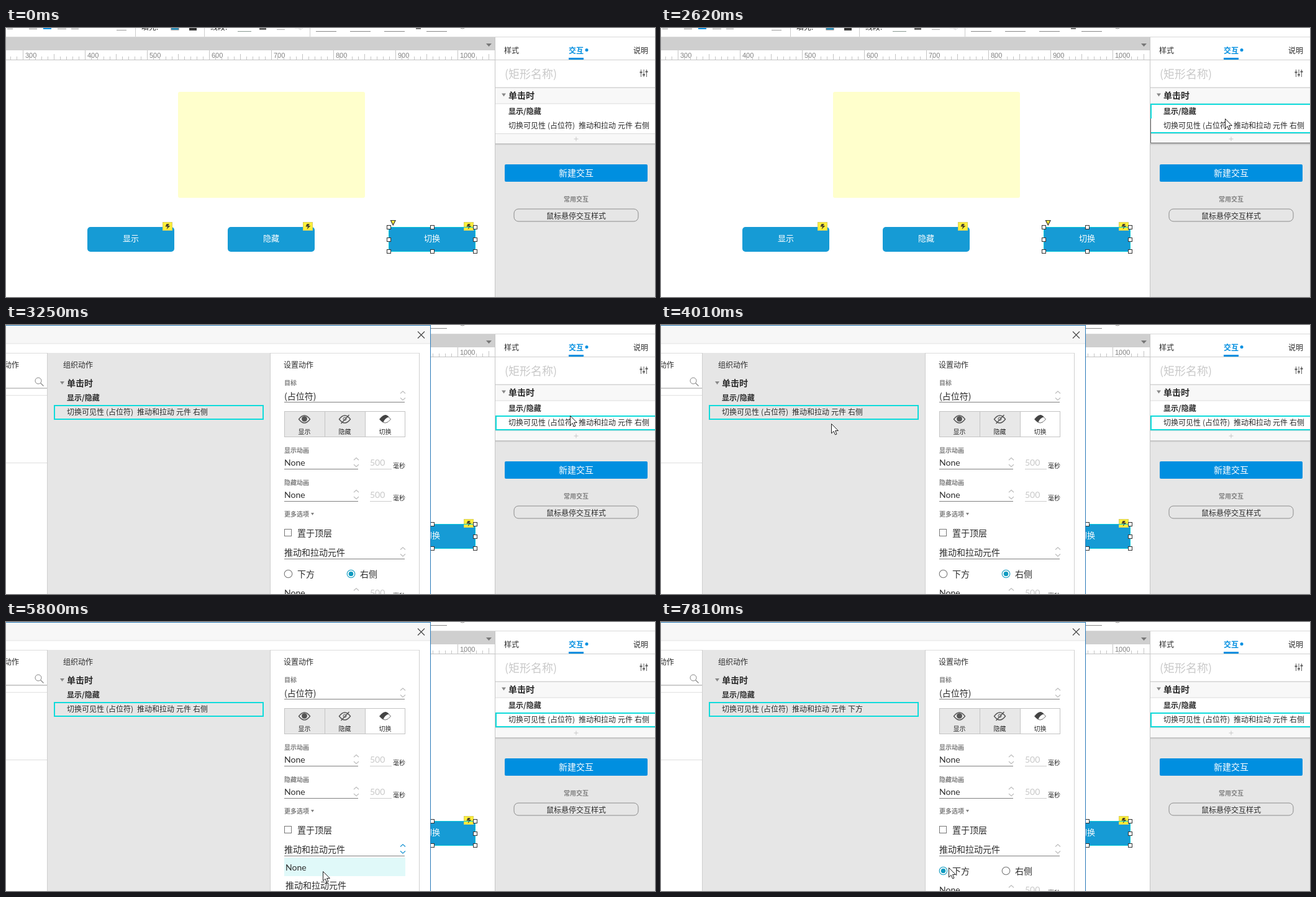
An HTML page for the animation above (8000 ms loop, 1045 by 434 pixels).

```html
<!DOCTYPE html>
<html lang="zh-CN">
<head>
<meta charset="utf-8">
<title>切换可见性</title>
<style>
  html, body { margin: 0; width: 100%; height: 100%; overflow: hidden; background: #fff; }
  svg { display: block; }
  text { font-family: "Noto Sans CJK SC", "Noto Sans CJK", "Noto Sans CJK JP", sans-serif; }
  .latin { font-family: Lato, sans-serif; }
  .ruler { font-family: "Liberation Sans", Arial, sans-serif; }
</style>
</head>
<body>
<svg id="stage" width="1045" height="434" viewBox="0 0 1045 434"></svg>
<script>
const LOOP = 8000;
const CYAN = '#0fdbdb', BLUE = '#008fe0', INK = '#2b2b2b', GRAY = '#808080';

const rect = (x, y, w, h, fill, extra = '') =>
  `<rect x="${x}" y="${y}" width="${w}" height="${h}" fill="${fill}" ${extra}/>`;
const frame = (x, y, w, h, color, width = 1, extra = '') =>
  rect(x, y, w, h, 'none', `stroke="${color}" stroke-width="${width}" ${extra}`);
const path = (d, stroke, width = 1, fill = 'none') =>
  `<path d="${d}" fill="${fill}" stroke="${stroke}" stroke-width="${width}"/>`;
// Text is placed by its left edge and the vertical centre of its glyphs.
const text = (x, cy, size, str, fill = INK, extra = '') =>
  `<text x="${x}" y="${cy + size * 0.38}" font-size="${size}" fill="${fill}" ${extra}>${str}</text>`;
const bold = 'font-weight="700"';
const latin = (x, cy, str, fill = INK) => text(x, cy, 14, str, fill, 'class="latin"');
const group = (id, body, extra = '') => `<g id="${id}" ${extra}>${body}</g>`;
const chevrons = (x, y, color = '#bdbdbd', id = '') =>
  `<path ${id && `id="${id}"`} d="M${x - 4} ${y - 3.5}l4-3.7 4 3.7m-8 7l4 3.7 4-3.7" fill="none" stroke="${color}" stroke-width="1.2"/>`;

function actionText(x, cy, sideId = '') {
  const words = [[0, '切换可见性'], [63, '(占位符)'], [113, '推动和拉动'], [176, '元件'], [203, '右侧']];
  return words.map(([dx, s], i) =>
    text(x + dx, cy, 12, s, INK, i === 4 && sideId ? `id="${sideId}"` : '')).join('');
}

function toolbar() {
  const marks = [
    [2, 1, 9, '#999'], [37, 1, 13, '#888'], [60, 0, 13, BLUE], [83, 1, 14, '#999'],
    [105, 1, 12, '#999'], [178, 3, 16, '#999'], [373, 5, 22, '#8a9a92'], [436, 2, 13, '#aaa'],
    [499, 5, 33, '#888'], [554, 5, 33, '#888'], [609, 5, 33, '#888'], [677, 5, 33, '#888']
  ];
  let s = rect(0, 0, 1045, 14, '#fff');
  for (const [x, y, w, c] of marks) s += rect(x, y, w, c === BLUE ? 2 : 1, c);
  for (const x of [208, 319, 489]) s += rect(x, 0, 1, 14, '#ccc');
  s += text(218, -2, 12, '填充:') + text(329, -2, 12, '线段:');
  s += rect(266, 0, 12, 3, '#169bd5', 'stroke="#777"') + rect(295, 0, 12, 4, '#333');
  s += rect(408, 0, 11, 3, '#666') + path('M465 0h9v3m-3-2l3 2 4-3', '#ddd');
  s += rect(660, 0, 8, 2, '#777') + path('M731 -2a4 3 0 0 0 8 0', '#999');
  return s + rect(0, 14, 1045, 1, '#d8d8d8');
}

function ruler() {
  let s = rect(0, 15, 787, 21, '#cfcfcf') + path('M773 25h9l-4.5 5z', 'none', 0, '#777');
  s += rect(0, 36, 787, 15, '#fff');
  for (let x = 7, n = 280; x < 787; x += 10, n += 10) {
    const h = n % 100 === 0 ? 15 : n % 50 === 0 ? 9 : 5;
    s += rect(x, 51 - h, 1, h, '#c4c4c4');
    if (n % 100 === 0) s += text(x + 4, 43.5, 11, n, '#808080', 'class="ruler"');
  }
  return s + rect(0, 51, 787, 1, '#c4c4c4');
}

function button(x, label, r = 5) {
  return rect(x, 321, 140, 40, '#169bd5', `rx="${r}"`) +
    text(x + 57, 339.5, 13, label, '#fff') +
    rect(x + 121.5, 313.5, 15, 13, '#ffef3a', 'stroke="#d8cf60"') +
    path(`M${x + 127.5} 316h4.5l-2 3h3.5l-6 6 1.5-4.5h-3.5z`, 'none', 0, '#4a4530');
}

function canvasArea() {
  let s = rect(277, 103, 301, 171, '#ffffcc', 'rx="3"');
  s += button(131, '显示') + button(357, '隐藏') + button(616, '切换', 0);
  s += frame(616.5, 321.5, 139, 39, '#08c8d8');
  for (const y of [321, 341, 360])
    for (const x of [616, 686, 755])
      if (x !== 686 || y !== 341) s += rect(x - 2.5, y - 2.5, 6, 6, '#fff', 'stroke="#333"');
  return s + path('M619.5 310.5h7.5l-3.75 7.5z', '#333', 1.2, '#ffef3a');
}

function sidePanel() {
  let s = rect(787, 15, 258, 419, '#e6e6e6') + rect(788, 15, 257, 81, '#fff');
  s += text(802, 36, 12, '样式') + text(906, 36, 12, '交互', BLUE, bold) + text(1010, 36, 12, '说明');
  s += `<circle cx="935" cy="35.5" r="2.5" fill="${BLUE}"/>`;
  s += rect(788, 51, 257, 1, '#d0d0d0') + rect(906, 48, 24, 3, BLUE);
  s += text(803, 74, 18, '(矩形名称)', '#c9c9c9');
  s += path('M1022.5 67v12m4.5-12v12m4.5-12v12', '#666') +
    path('M1020.5 71.5h4m.5 4h4m.5-5h4', '#555', 2);
  s += rect(788, 95.5, 257, 1.5, '#d4d4d4') + rect(788, 97, 257, 25, '#f8f8f8');
  s += path('M798 105.5h7l-3.5 5z', 'none', 0, '#888') + text(809, 108.5, 14, '单击时', INK, bold);
  s += rect(788, 121, 257, 2, '#ececec') + rect(788, 123, 257, 47, '#fff');
  s += text(809, 134, 12, '显示/隐藏', INK, bold) + actionText(809, 157);
  s += rect(788, 170, 257, 1, '#dcdcdc') + rect(788, 171, 257, 15, '#f8f8f8');
  s += path('M914.5 179h7m-3.5-3.5v7', '#c8c8c8') + rect(788, 186, 257, 2.5, '#c9c9c9');
  s += rect(803, 220, 230, 28, BLUE, 'rx="2"') + text(890, 234, 14, '新建交互', '#fff');
  s += text(898, 276, 10, '常用交互', GRAY, bold);
  s += frame(818, 292, 200, 20, '#8c8c8c', 1, 'rx="7"') + text(870, 303, 12, '鼠标悬停交互样式');
  s += group('rowHover', frame(789, 147, 270, 22, CYAN, 2));
  s += group('actionHover', path('M789 146V123H1046M789 169H1046', CYAN, 2) +
    path('M788.5 146V185.5H1046', '#666'));
  return s + rect(787, 15, 1, 419, '#c6c6c6');
}

function animationRow(labelY, label) {
  const y = labelY + 19.5;
  return (label ? text(448, labelY, 10, label, GRAY, bold) : '') +
    latin(448, y, 'None') + chevrons(564, y) + rect(448, y + 10.5, 119, 1, '#808080') +
    latin(586, y, '500', '#c8c8c8') + rect(586, y + 10.5, 35, 1, '#ccc') +
    text(623, y + 5.5, 10, '毫秒', INK, 'font-weight="500"');
}

function visibilityToggle() {
  let s = rect(448, 139, 130, 42, '#e8e8e8') + frame(448.5, 139.5, 194, 41, '#c4c4c4') +
    path('M513.5 139v42M578.5 139v42', '#c4c4c4');
  ['显示', '隐藏', '切换'].forEach((label, i) => {
    const x = 480.5 + i * 65;
    const eye = `M${x - 9} 152q9-12 18 0q-9 12-18 0z`;
    if (i < 2) {
      s += path(eye, '#555', 1.4) + `<circle cx="${x}" cy="151.5" r="${i ? 2.5 : 4}" fill="${i ? 'none' : '#555'}" stroke="#555"/>`;
      if (i) s += path(`M${x - 6} 159l13-14`, '#555', 1.4);
    } else {
      s += path(eye, '#666', 1, '#fff') + path(`M${x - 9} 152q9-12 15-3.5q-6 1-9 8.5q-4-2-6-5z`, 'none', 0, '#444');
    }
    s += text(x - 10, 172, 10, label, INK, 'font-weight="500"');
  });
  return s;
}

function radio(id, cx, label) {
  return `<circle id="${id}Ring" cx="${cx}" cy="401.5" r="6.3" fill="#fff" stroke="#777" stroke-width="1.1"/>` +
    `<circle id="${id}Dot" cx="${cx}" cy="401.5" r="3.8" fill="#0f9bc0"/>` +
    text(cx + 14.5, 401.5, 14, label);
}

function dialog() {
  let s = rect(0, 0, 684, 434, '#fff') + rect(-20, 1, 703, 29, '#f7f7f7') + rect(-20, 29.5, 703, 1, '#e4e4e4');
  s += path('M663 10.5l11 11m0-11l-11 11', '#444', 1.1);
  s += rect(-20, 45, 86, 395, '#fff') + rect(-20, 45, 686, 1, '#ddd');
  s += text(-15, 64, 12, '加动作') + `<circle cx="52" cy="90" r="5" fill="none" stroke="#888"/>` + path('M55.5 93.5l5 5', '#888', 1.2);
  s += rect(-20, 101.5, 86, 1, '#999') + rect(-20, 113, 86, 1, '#e0e0e0') + rect(-20, 222, 86, 1, '#ddd');
  s += rect(66, 45, 360, 400, '#e6e6e6') + path('M66.5 45V445M425.5 45V445M665.5 45V445', '#cfcfcf');
  s += text(92, 64, 12, '组织动作') + path('M87 91h7l-3.5 5z', 'none', 0, '#888');
  s += text(98, 93.5, 14, '单击时', INK, bold) + text(98, 117, 12, '显示/隐藏', INK, bold);
  s += frame(78, 130, 336, 22, CYAN, 2) + actionText(98, 140, 'sideWord');
  s += text(447, 64, 12, '设置动作') + text(448, 93.5, 10, '目标', GRAY, bold);
  s += text(448, 115, 14, '(占位符)') + rect(448, 124, 194, 1, '#808080') + chevrons(639, 114);
  s += visibilityToggle() + animationRow(202, '显示动画') + animationRow(254, '隐藏动画');
  s += text(448, 305.5, 10, '更多选项', GRAY, bold) + path('M491 303h5l-2.5 4z', 'none', 0, GRAY);
  s += rect(448.5, 329.5, 11, 11, '#fff', 'stroke="#777"') + text(469, 335.5, 14, '置于顶层');
  s += text(448, 366.5, 14, '推动和拉动元件') + rect(448, 377, 194, 1, '#808080') + chevrons(639, 366, '#bdbdbd', 'listArrows');
  s += radio('below', 454.5, '下方') + radio('right', 555.5, '右侧') + animationRow(412.5, '');
  s += group('list', rect(447, 379, 197, 70, '#fff') +
    rect(448, 380, 195, 30, '#e0f9f9', 'id="listHover"') + latin(450, 395.5, 'None') + text(450, 424.5, 14, '推动和拉动元件'));
  return s + rect(-20, 0, 704, 1, '#2a7ab8') + rect(683, 0, 1, 450, '#2a7ab8');
}

const stage = document.getElementById('stage');
stage.innerHTML = rect(0, 0, 1045, 434, '#fff') + canvasArea() + ruler() + toolbar() + sidePanel() +
  group('dialog', dialog()) +
  group('cursor', path('M.5 .5V15.8L4.1 12.4 6.5 18 9 17 6.6 11.5H11.4Z', '#222', 1, '#fff'));
const $ = id => document.getElementById(id);
const show = (id, on) => { $(id).style.display = on ? '' : 'none'; };

// start, end, steps, x, y
const moves = [
  [610, 610, 1, 916, 432], [690, 690, 1, 917, 470], [1070, 1300, 4, 909, 157],
  [1610, 1760, 3, 910, 120], [2010, 2090, 2, 908, 134], [2470, 2620, 3, 908, 146],
  [3320, 3780, 7, 300, 178], [3860, 4090, 4, 247, 140], [4240, 4320, 2, 237, 132],
  [4550, 4700, 3, 463, 393], [4780, 4780, 1, 463, 470], [4940, 5250, 5, 560, 364],
  [5330, 5410, 2, 512, 418], [5730, 5800, 2, 510, 402], [5880, 5970, 2, 512, 416],
  [6810, 7190, 6, 459, 402], [7810, 7810, 1, 463, 396]
];
// start, scale, opacity
const opening = [[3020, 0.96, 0.3], [3100, 0.984, 0.64], [3170, 0.995, 0.9], [3250, 1, 1]];

function cursorAt(t) {
  let x = 916, y = 470;
  for (const [start, end, steps, tx, ty] of moves) {
    if (t < start) break;
    const p = Math.min(1, (t - start) / Math.max(1, end - start));
    const k = (Math.floor(p * (steps - 1) + 1e-6) + 1) / steps;
    x += (tx - x) * Math.min(1, k);
    y += (ty - y) * Math.min(1, k);
  }
  return [Math.round(x), Math.round(y)];
}

function setRadio(id, on) {
  show(id + 'Dot', on);
  $(id + 'Ring').setAttribute('stroke', on ? '#0f9bc0' : '#777');
}

function render(t) {
  const [x, y] = cursorAt(t);
  $('cursor').setAttribute('transform', `translate(${x} ${y})`);

  show('actionHover', t >= 2010 && t < 2770);
  show('rowHover', (t >= 1300 && t < 2010) || t >= 2770);

  const pose = opening.filter(o => t >= o[0]).pop();
  show('dialog', pose);
  if (pose) {
    const [, scale, alpha] = pose;
    $('dialog').setAttribute('transform', `translate(${246 * (1 - scale)} ${275 * (1 - scale)}) scale(${scale})`);
    $('dialog').setAttribute('opacity', alpha);
  }

  show('list', t >= 5250 && t < 6450);
  show('listHover', y >= 380);
  $('listHover').setAttribute('y', y < 410 ? 380 : 410);
  $('listArrows').setAttribute('stroke', t >= 5170 && t < 6810 ? '#1a94d2' : '#bdbdbd');

  const below = t >= 7350;
  setRadio('below', below);
  setRadio('right', !below);
  $('sideWord').textContent = below ? '下方' : '右侧';
}

const begin = performance.now();
function tick() {
  render((performance.now() - begin) % LOOP);
  requestAnimationFrame(tick);
}
tick();
</script>
</body>
</html>
```
